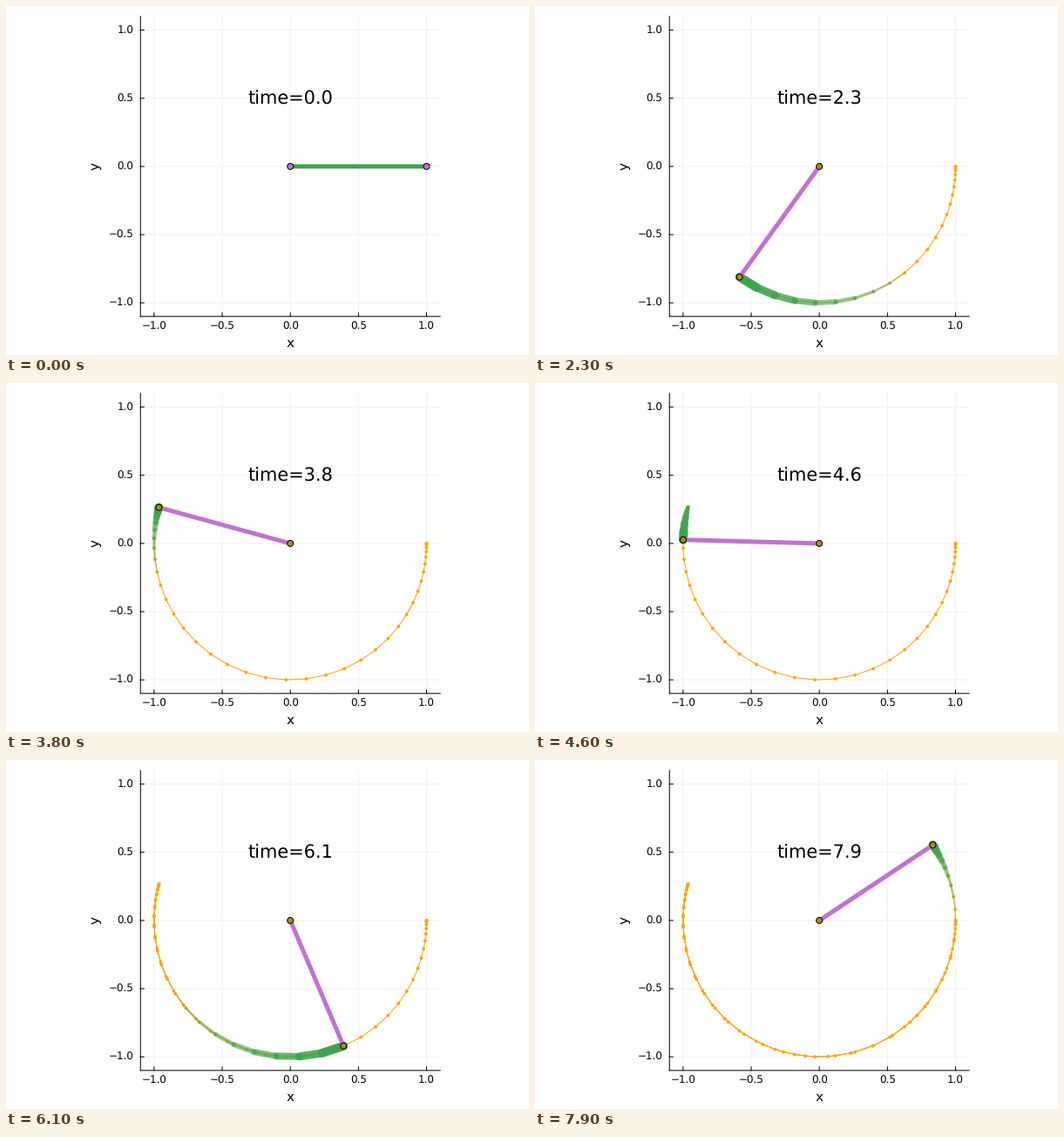
Write a matplotlib script that moves like this. It is 600 px wide and 400 px high and loops after 8000 ms.

```python
import matplotlib.pyplot as plt
import numpy as np
from matplotlib.animation import FuncAnimation
from matplotlib.collections import LineCollection
from matplotlib.colors import to_rgb

W, H, DPI = 600, 400, 100
FRAMES, DT, TAIL = 80, 0.1, 10
CX, CY, UNIT = 326.2, 183.9, 156.3
REACH = 1.1 * UNIT
LEFT, RIGHT, TOP, BOTTOM = CX - REACH, CX + REACH, CY - REACH, CY + REACH
GREEN, PURPLE, GOLD, ORANGE = "#3da44d", "#c271d2", "#ac8d18", "#ffa500"
PX = 72 / DPI  # points per pixel
DOT, END = (3.8 * PX) ** 2, (7 * PX) ** 2  # marker areas

plt.rcParams["font.family"] = "DejaVu Sans"
plt.rcParams["text.hinting"] = "none"


def swing():
    """Pendulum released from horizontal, integrated with explicit Euler."""
    angle, speed = 0.0, 0.0
    angles = []
    for _ in range(FRAMES):
        angles.append(angle)
        angle, speed = angle + DT * speed, speed + DT * np.cos(angle)
    angles = np.array(angles)
    return np.column_stack([CX + UNIT * np.cos(angles),
                            CY + UNIT * np.sin(angles)])


path = swing()

fig = plt.figure(figsize=(W / DPI, H / DPI), dpi=DPI, facecolor="white")
ax = fig.add_axes([0, 0, 1, 1])
ax.set_xlim(0, W)
ax.set_ylim(H, 0)
ax.axis("off")


def line(xs, ys, color="black", width=1.0, **kw):
    return ax.plot(xs, ys, color=color, lw=width * PX, snap=False, **kw)[0]


def text(x, y, s, size, ha="center", **kw):
    return ax.text(x, y, s, fontsize=size, ha=ha, va="baseline", **kw)


def draw_axes():
    for v in (-1.0, -0.5, 0.0, 0.5, 1.0):
        x, y = CX + UNIT * v, CY - UNIT * v
        name = f"{v:.1f}".replace("-", "\u2212")
        line([x, x], [TOP, BOTTOM], "#f0f0f0", zorder=0)
        line([LEFT, RIGHT], [y, y], "#f0f0f0", zorder=0)
        line([x, x], [BOTTOM, BOTTOM - 4], zorder=1)
        line([LEFT, LEFT + 4], [y, y], zorder=1)
        text(x, 371.3, name, 8.6)
        text(146.5, y + 3.8, name, 8.6, ha="right")
    line([LEFT, LEFT], [TOP, BOTTOM], zorder=1)
    line([LEFT, RIGHT], [BOTTOM, BOTTOM], zorder=1)
    text(CX, 391.2, "x", 11)
    text(106.8, CY - 0.7, "y", 11, rotation=90, rotation_mode="anchor")


draw_axes()
history = line([], [], ORANGE, 1, zorder=2)
dots = ax.scatter([], [], color=ORANGE, linewidths=0, zorder=2.5)
tail = LineCollection([], capstyle="round", zorder=3)
ax.add_collection(tail, autolim=False)
rod = line([], [], PURPLE, 5, zorder=4, solid_capstyle="butt")
ends = ax.scatter([CX, CX], [CY, CY], s=[END, END], edgecolors="black",
                  linewidths=PX, zorder=5)
label = text(CX, 113.2, "", 15, zorder=6)


def update(i):
    history.set_data(*path[:i + 1].T)
    dots.set_offsets(path[:i + 1])
    dots.set_sizes(np.full(i + 1, DOT))

    recent = path[max(0, i - TAIL):i + 1]
    grow = np.linspace(0, 1, len(recent))[1:]
    tail.set_segments(list(np.stack([recent[:-1], recent[1:]], axis=1)))
    tail.set_linewidths(list(10 * PX * grow) or [0])
    tail.set_color([(*to_rgb(GREEN), a) for a in grow])

    joints = np.array([(CX, CY), path[i]])
    rod.set_data(*joints.T)
    rod.set_color(PURPLE if i else GREEN)
    ends.set_offsets(joints)
    ends.set_facecolor(GOLD if i else PURPLE)
    label.set_text(f"time={i * DT:.1f}")
    return history, dots, tail, rod, ends, label


anim = FuncAnimation(fig, update, frames=FRAMES, interval=100,
                     init_func=lambda: update(0), repeat=True, repeat_delay=0)
plt.show()
```
